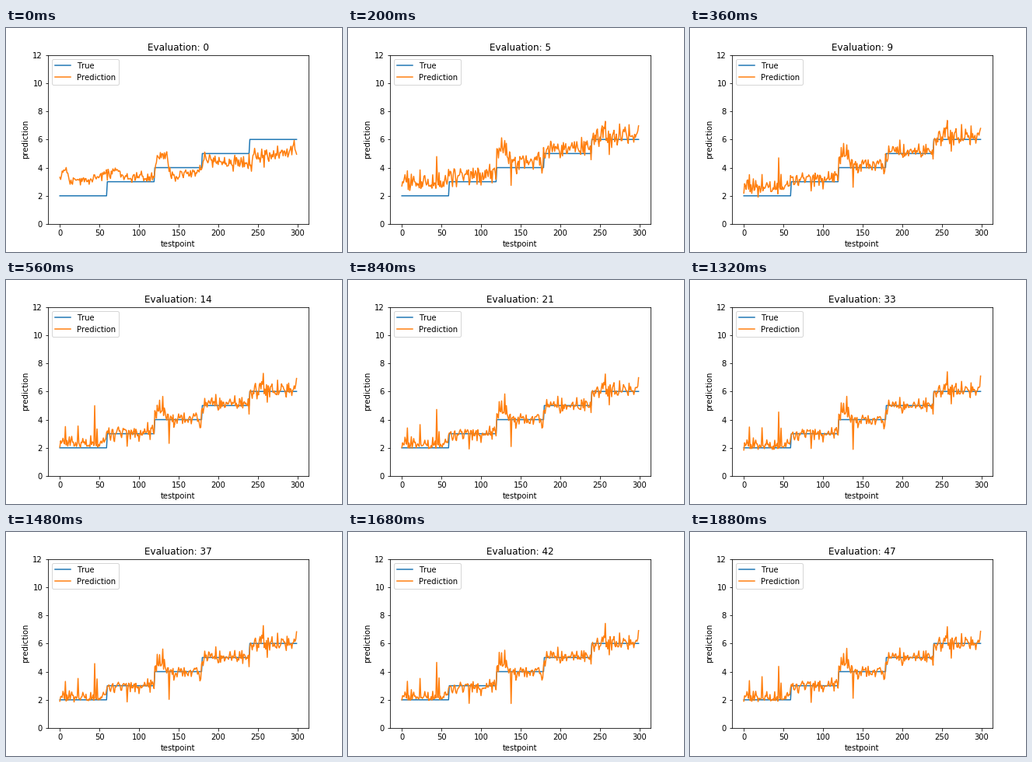
Write a matplotlib script that moves like this. It is 432x288 px and loops after 1920 ms.

```python
import numpy as np
import matplotlib.pyplot as plt
from matplotlib.animation import FuncAnimation

FRAMES, STEP_MS = 48, 40
N, SEG = 300, 60
SETTLE = 5  # evaluations until the curve follows the steps

x = np.arange(N)
seg = x // SEG
true = 2.0 + seg
rng = np.random.default_rng(12)

# Stable ripple around the steps; the lowest step is overshot, rarely undershot
ripple = rng.normal(0, 0.26, N)
ripple = np.where(seg == 0, np.abs(1.5 * ripple) - 0.05, ripple)

# Outliers that persist through training: testpoint -> deviation
OUTLIERS = {7: 1.4, 23: 1.6, 44: 2.7, 47: 1.4, 85: -1.1, 123: 1.2,
            130: 1.6, 138: -2.0, 197: 0.7, 257: 1.3, 262: -1.0, 299: 0.9}
hump = 0.6 * np.exp(-((x - 128) / 7) ** 2)
spike = np.zeros(N)
for i, dev in OUTLIERS.items():
    spike[i] = dev
ripple[list(OUTLIERS)] = 0
hump[list(OUTLIERS)] = 0

# Untrained prediction: a slow rise with one bump, plus noise
level = np.interp(x, [0, 7, 12, 35, 70, 85, 119, 123, 136, 139, 178, 182, 210, 240, 299],
                  [3.3, 3.9, 3.1, 3.1, 3.8, 3.3, 3.3, 4.9, 4.8, 3.5, 3.7, 4.7, 4.2, 4.4, 5.5])
first = level + rng.normal(0, 0.12 + 0.22 * x / N, N)

early_bias = np.array([0.6, 0.4, 0.45, 0.3, 0.25])[seg]


def prediction(k):
    r = np.random.default_rng(100 + k)
    lag = np.exp((SETTLE - max(k, SETTLE)) / 6)
    drift = r.normal(0, 0.04, 5)[seg]
    wobble = r.normal(1, 0.06, N)
    y = true + early_bias * lag + drift + r.normal(0, 0.05 + 0.12 * lag, N)
    y += (ripple + hump) * (1 + 0.4 * lag) + spike * wobble * (1 - 0.18 * lag)
    blend = max(0, 1 - k / SETTLE) ** 1.5
    return blend * first + (1 - blend) * y


plt.rcParams.update({"font.family": "DejaVu Sans", "font.size": 10,
                     "text.kerning_factor": 6})
fig, ax = plt.subplots(figsize=(6, 4), dpi=72)
fig.subplots_adjust(left=0.125, right=0.9, bottom=0.125, top=0.88)
ax.plot(x, true, color="#1f77b4", label="True")
line, = ax.plot(x, first, color="#ff7f0e", label="Prediction")
ax.set_ylim(0, 12)
ax.set_xticks(range(0, 301, 50))
ax.set_yticks(range(0, 13, 2))
ax.set_xlabel("testpoint")
ax.set_ylabel("prediction")
title = ax.set_title("Evaluation: 0")
ax.legend(loc="upper left")


def update(k):
    line.set_ydata(prediction(k))
    title.set_text(f"Evaluation: {k}")
    return line, title


anim = FuncAnimation(fig, update, frames=FRAMES, interval=STEP_MS,
                     repeat=True, repeat_delay=0, blit=False)
plt.show()
```
